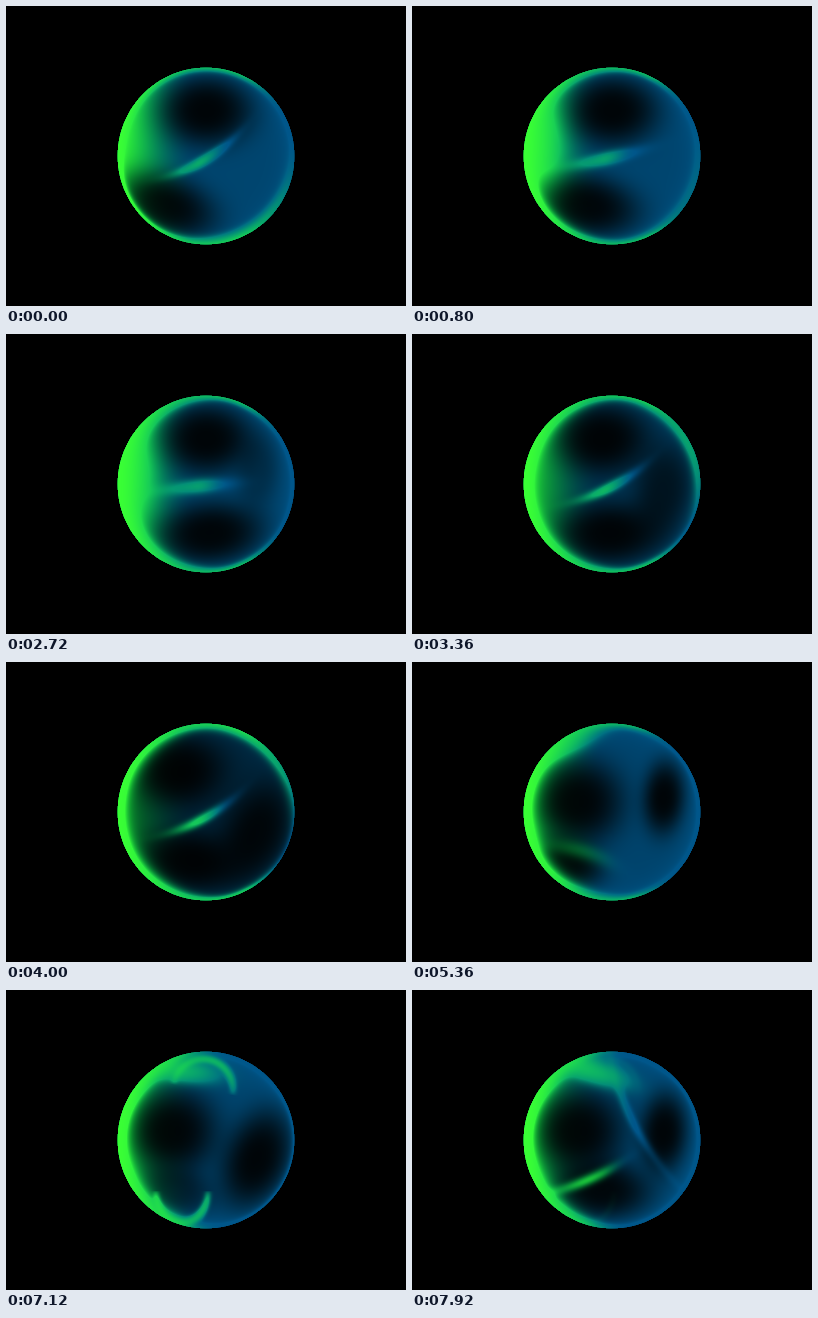
An HTML page with a canvas for the animation above (8000 ms loop, 400 px wide and 300 px high).

```html
<!DOCTYPE html>
<html lang="en">
<head>
<meta charset="utf-8">
<title>Glowing orb</title>
<style>
html, body { margin: 0; width: 100%; height: 100%; overflow: hidden; background: #000; }
canvas { display: block; width: 400px; height: 300px; }
</style>
</head>
<body>
<canvas id="stage" width="400" height="300"></canvas>
<script>
const ctx = document.getElementById('stage').getContext('2d');
const LOOP = 8000, STEP = 80;
const CX = 200, CY = 150, R = 88.7;
const BOX = 180, LEFT = CX - BOX / 2, TOP = CY - BOX / 2;
const image = ctx.createImageData(BOX, BOX);

const clamp = (v, lo = 0, hi = 1) => Math.min(hi, Math.max(lo, v));
const mix = (a, b, k) => a + (b - a) * k;
const ramp = (a, b, v) => {
  const k = clamp((v - a) / (b - a));
  return k * k * (3 - 2 * k);
};
const pulse = (t, peak, spread) => Math.exp(-(((t - peak) / spread) ** 2));
const wave = (t, peak, period) => Math.cos((t - peak) / period * 2 * Math.PI);
const radians = deg => deg * Math.PI / 180;

// Position along and across an axis turned by deg
function axis(x, y, deg) {
  const c = Math.cos(radians(deg)), s = Math.sin(radians(deg));
  return (px, py) => [(px - x) * c + (py - y) * s, (py - y) * c - (px - x) * s];
}

// Soft dark oval
function cell({ x, y, deg = 0, rx, ry, power }) {
  const local = axis(x, y, deg);
  return (px, py) => {
    const [u, w] = local(px, py);
    return 1 - power * Math.exp(-(Math.hypot(u / rx, w / ry) ** 3));
  };
}

// Soft bright line or patch
function ridge({ x, y, deg, length, width, bend = 0, power }) {
  const local = axis(x, y, deg);
  return (px, py) => {
    const [u, w] = local(px, py);
    const d = (w + bend * u * u) / width;
    return power * Math.exp(-d * d - (u / length) ** 2);
  };
}

// Bright outline of an oval, strongest towards deg
function arc({ x, y, rx, ry, deg, width, focus, power }) {
  const dx = Math.cos(radians(deg)), dy = Math.sin(radians(deg));
  return (px, py) => {
    const u = (px - x) / rx, w = (py - y) / ry, r = Math.hypot(u, w) || 1;
    const facing = clamp((u * dx + w * dy) / r);
    const d = (r - 1) * Math.min(rx, ry) / width;
    return power * facing ** focus * Math.exp(-d * d);
  };
}

function scene(t) {
  const swing = wave(t, 0, 3700);
  const sway = wave(t, 2625, 6500);
  const bob = wave(t, 6900, 2900);
  const sink = ramp(3600, 5600, t);
  const squeeze = pulse(t, 6200, 1200);
  const loop = pulse(t, 7120, 450);
  const crown = ramp(4200, 5400, t);
  const turn = ramp(5400, 7900, t);
  const side = ramp(1500, 4500, t);

  return {
    base: .8 - .38 * pulse(t, 4000, 800),
    rimWidth: 3 + 4.5 * ramp(0, 1500, t),
    rimEnd: mix(257, 193, ramp(4500, 7100, t)),
    cells: [
      cell({ x: mix(200, 165, ramp(2700, 4500, t)), y: mix(104, 141, sink),
        rx: 47, ry: mix(36, 44, sink), power: .93 }),
      cell({ x: 178 + 26 * sway, y: 200, deg: 8 - 12 * sway,
        rx: 54 - 28 * squeeze, ry: 32 - 12 * squeeze, power: .92 - .35 * loop }),
      cell({ x: 252, y: 153 + 18 * bob, deg: 5 + 20 * clamp(bob),
        rx: 28 + 7 * bob, ry: 45 + 8 * bob, power: .93 * side })
    ],
    // Lights whose green depends on where they fall
    seams: [
      ridge({ x: mix(196, 172, sink) + 6 * swing, y: mix(152, 190, sink), deg: -8 - 24 * swing,
        length: 32, width: 6.5 - 2 * swing, bend: .003 * swing,
        power: (.55 + .3 * swing) * (1 - loop) }),
      ridge({ x: 222, y: 134, deg: 63, length: 52, width: 4.5, bend: .002,
        power: .5 * ramp(7100, 7900, t) })
    ],
    // Pure green lights
    glows: [
      ridge({ x: 128, y: 135, deg: 90, length: 50, width: 24,
        power: .85 * pulse(t, 1700, 1100) }),
      ridge({ x: mix(160, 178, turn), y: 79, deg: mix(-30, 20, turn), length: 32, width: 11,
        power: crown * mix(.55, 1, turn) }),
      arc({ x: CX, y: CY, rx: R, ry: R, deg: 62 - 115 * t / 4000, width: 7, focus: 4,
        power: clamp(swing) }),
      arc({ x: 176, y: 201, rx: 26, ry: 32, deg: 90, width: 3.5, focus: .5, power: loop }),
      arc({ x: 197, y: 100, rx: 30, ry: 31, deg: -80, width: 3.5, focus: .8, power: loop })
    ]
  };
}

function draw(t) {
  const { base, rimWidth, rimEnd, cells, seams, glows } = scene(t);
  const data = image.data;

  for (let j = 0; j < BOX; j++) {
    for (let i = 0; i < BOX; i++) {
      const x = LEFT + i + .5, y = TOP + j + .5;
      const r = Math.hypot(x - CX, y - CY);
      const p = (j * BOX + i) * 4;
      data[p + 3] = 255;
      const cover = clamp(R - r + .5);
      if (!cover) {
        data[p] = data[p + 1] = data[p + 2] = 0;
        continue;
      }
      let green = 0, blue = 0;
      const add = (v, hue) => {
        green += v * hue;
        blue += v * (1 - hue);
      };

      const body = cells.reduce((v, f) => v * f(x, y), base);
      add(body + .2 * (r / R) ** 8, 1 - ramp(108, 190, x));
      for (const f of seams) add(f(x, y), 1 - ramp(190, 224, x));
      for (const f of glows) add(f(x, y), 1);

      const rimHue = 1 - ramp(rimEnd - 24, rimEnd + 24, x);
      const width = mix(2.6, rimWidth, 1 - ramp(130, 225, x));
      add(mix(.5, 1.3, rimHue) * Math.exp(-(((R - r) / width) ** 1.3)), rimHue);

      const scale = cover / Math.max(1, green + blue);
      green *= scale;
      blue *= scale;
      data[p] = 58 * green ** 2.5;
      data[p + 1] = 255 * green + 86 * blue;
      data[p + 2] = 52 * green + 138 * blue + 40 * green * (1 - green);
    }
  }
  ctx.putImageData(image, LEFT, TOP);
}

ctx.fillRect(0, 0, 400, 300);
const start = performance.now();
let shown = -1;
function tick() {
  const t = Math.floor((performance.now() - start) % LOOP / STEP) * STEP;
  if (t !== shown) draw(shown = t);
  requestAnimationFrame(tick);
}
tick();
</script>
</body>
</html>
```
